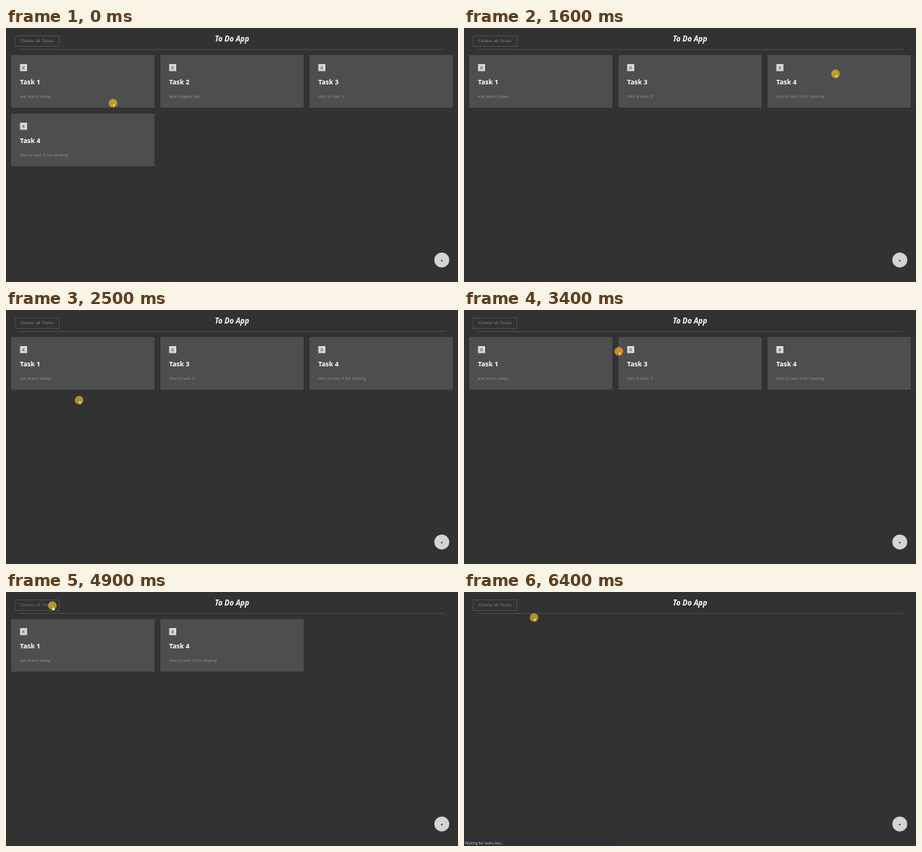
An HTML page for the animation above (6.6 s loop, 600 by 338 pixels).

```html
<!DOCTYPE html>
<html lang="en">
<head>
<meta charset="utf-8">
<title>To Do App</title>
<style>
  html, body { margin: 0; width: 100%; height: 100%; overflow: hidden; background: #323232; }
  svg { display: block; width: 600px; height: 338px; }
  text { font-family: "Open Sans", "Noto Sans", sans-serif; }
  .heading { font-size: 9.8px; font-weight: 700; font-style: italic; fill: #fff; text-anchor: middle; }
  .name { font-size: 8.8px; font-weight: 700; fill: #fff; }
  .note { font-size: 5.95px; fill: #929292; }
  .card { fill: #4e4e4e; }
  .close { fill: #d8d8d8; }
  .label, .x, .plus { font-family: "Liberation Sans", Arial, sans-serif; }
  .x { font-size: 5.8px; text-anchor: middle; }
  .plus { font-size: 5.6px; font-weight: 700; fill: #222; text-anchor: middle; }
  .status { font-size: 4.9px; fill: #c4c8cb; }
  .label { font-size: 6.25px; fill: #7a7a7a; }
  .frame { fill: none; stroke: #4c4c4c; }
  .pressed .label { fill: #6c6c6c; }
  .focused .label { fill: #2b2a2b; }
  .focused .frame { fill: #3a393b; stroke: #3a393b; stroke-width: 2; }
</style>
</head>
<body>
<svg viewBox="0 0 600 338">
  <rect width="600" height="338" fill="#323232"/>
  <path d="M17 28.5H582" stroke="#4c4c4c"/>
  <g id="clear">
    <rect class="frame" x="12" y="10.5" width="58.5" height="14"/>
    <text class="label" x="19.4" y="19.3">Delete all Tasks</text>
  </g>
  <text class="heading" x="300" y="18">To Do App</text>
  <g id="cards"></g>
  <circle cx="578.5" cy="308.8" r="10" fill="#d4d4d4"/>
  <text class="plus" x="578.5" y="310.7">+</text>
  <g id="status">
    <rect y="330" width="199" height="8" fill="#2f3035"/>
    <text class="status" x="1.3" y="335.6">Waiting for tasks.test...</text>
  </g>
  <g id="cursor">
    <circle r="5.7" fill="#ffd01c" fill-opacity=".62"/>
    <circle id="ring" r="5.2" fill="#f07818" fill-opacity=".4" stroke="#e8781c" stroke-width="1.2"/>
    <path id="arrow" d="M0 0V5L1.2 4L2 5.6L2.8 5.2L2 3.7H3.5Z" fill="#fff" stroke="#333" stroke-width=".3"/>
    <path id="hand" d="M.4 .6Q.9 0 1.4 .6V2.6L3.3 3.2V5L2.6 6.6H.5L-1 4.4L-.5 3.9L.4 4.6Z" fill="#fff" stroke="#333" stroke-width=".3"/>
  </g>
</svg>
<script>
const LOOP = 6600, STEP = 100, RELOAD = 6300;
const $ = id => document.getElementById(id);

const tasks = [
  { note: "eat learn sleep", gone: RELOAD },
  { note: "learn again eat...", gone: 1600 },
  { note: "this is task 3", gone: 3800 },
  { note: "this is task 4 for testing", gone: RELOAD }
];

// Where the pointer turns or rests, and when it clicks
const stops = [
  { t: 0, x: 142, y: 100 },
  { t: 300, x: 123, y: 180 },
  { t: 700, x: 180, y: 67 },
  { t: 1000, x: 222.5, y: 53.5 },
  { t: 1400, x: 222.5, y: 53.5, click: true },
  { t: 1700, x: 527, y: 62 },
  { t: 1800, x: 375.5, y: 74.5 },
  { t: 2500, x: 97, y: 120 },
  { t: 3400, x: 205.5, y: 55, click: true },
  { t: 3500, x: 218, y: 54 },
  { t: 4000, x: 61.5, y: 18 },
  { t: 4700, x: 61.5, y: 18, click: true },
  { t: 5300, x: 61.5, y: 18 },
  { t: 5900, x: 93, y: 34 },
  { t: LOOP, x: 93, y: 34 }
];

const cards = tasks.map(({ note }, i) => {
  const g = document.createElementNS("http://www.w3.org/2000/svg", "g");
  g.innerHTML = `<rect class="card" width="190" height="70"/>
    <rect class="close" width="9.4" height="9.4" x="11.6" y="12"/>
    <text class="x" x="16.3" y="18.8">X</text>
    <text class="name" x="11.6" y="39.4">Task ${i + 1}</text>
    <text class="note" x="11.6" y="56.6">${note}</text>`;
  $("cards").append(g);
  return g;
});

const show = (el, on) => el.setAttribute("visibility", on ? "visible" : "hidden");
const clamp = (v, lo, hi) => Math.min(hi, Math.max(lo, v));
const inside = (p, l, t, w, h) => p.x >= l && p.x <= l + w && p.y >= t && p.y <= t + h;

function pointerAt(t) {
  const i = stops.findIndex(s => s.t > t);
  const a = stops[i - 1], b = stops[i];
  const k = 1 - (1 - (t - a.t) / (b.t - a.t)) ** 2;
  return { x: a.x + (b.x - a.x) * k, y: a.y + (b.y - a.y) * k };
}

// The last card's close button fades back in after sliding under the pointer
function closeAlpha(i, t) {
  const slid = tasks[2].gone;
  return i === 3 && t >= slid ? clamp((t - slid - 300) / 300, .2, 1) : 1;
}

function draw(t) {
  const p = pointerAt(t);
  let slot = 0;
  let over = inside(p, 12, 10, 59, 15);
  cards.forEach((g, i) => {
    const alive = t < tasks[i].gone;
    show(g, alive);
    if (!alive) return;
    const left = 7 + slot % 3 * 198, top = 36 + Math.floor(slot / 3) * 78;
    slot++;
    g.setAttribute("transform", `translate(${left} ${top})`);
    const alpha = closeAlpha(i, t);
    g.children[1].setAttribute("fill-opacity", alpha);
    g.children[2].setAttribute("fill", alpha < .5 ? "#a0a0a0" : "#222");
    over = over || inside(p, left + 11, top + 11, 11, 11);
  });
  $("clear").classList.toggle("pressed", t >= 4800 && t < RELOAD);
  $("clear").classList.toggle("focused", t >= RELOAD - STEP && t < RELOAD);
  show($("status"), t >= RELOAD + STEP);
  show($("ring"), stops.some(s => s.click && t >= s.t && t < s.t + STEP));
  show($("hand"), over);
  show($("arrow"), !over);
  $("cursor").setAttribute("transform", `translate(${p.x} ${p.y})`);
}

const start = performance.now();
function tick() {
  const t = (performance.now() - start) % LOOP;
  draw(Math.floor(t / STEP) * STEP);
  requestAnimationFrame(tick);
}
tick();
</script>
</body>
</html>
```
